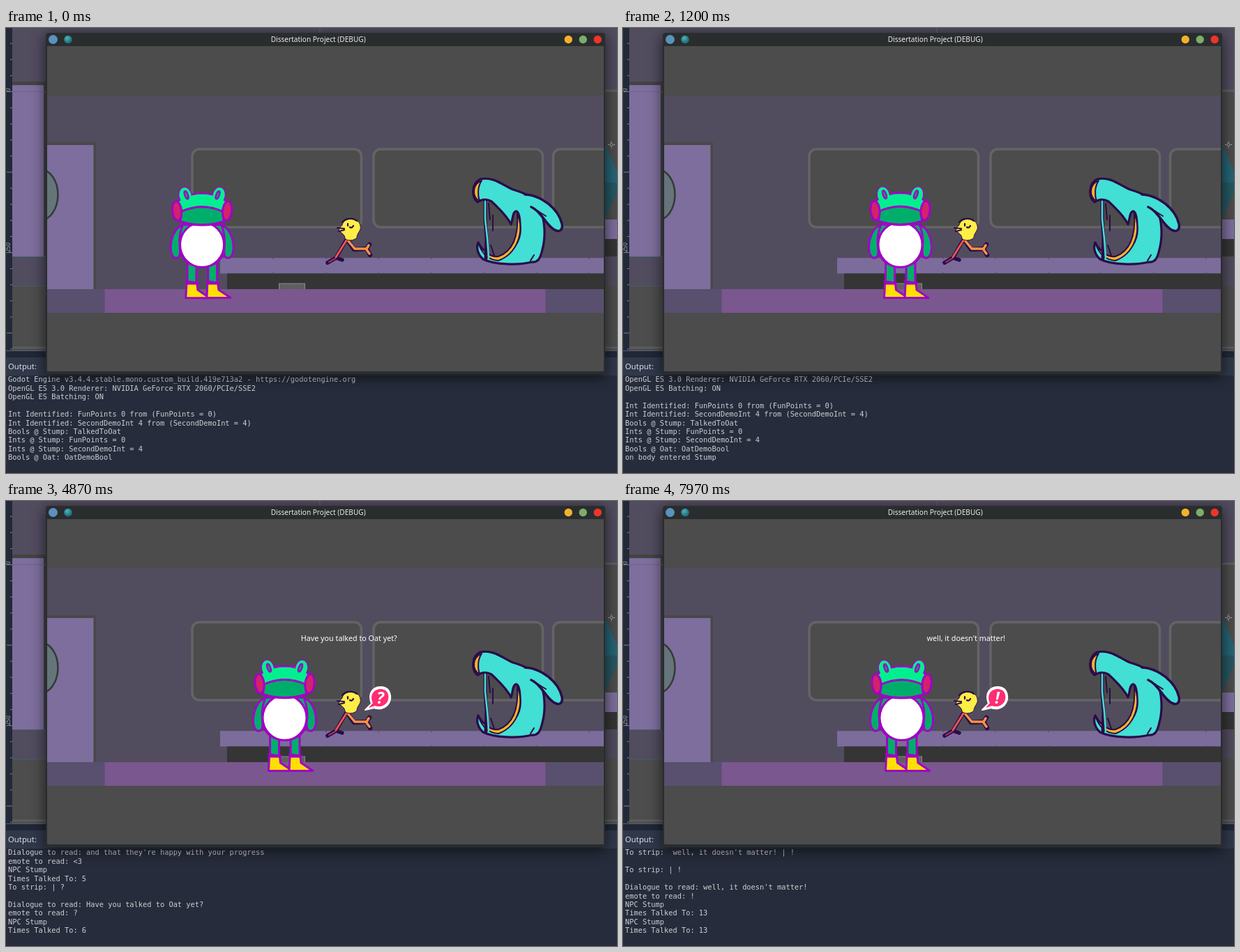
An HTML page for the animation above (8000 ms loop, 876 px wide and 639 px high).

```html
<!DOCTYPE html>
<html lang="en">
<head>
<meta charset="utf-8">
<title>Dialogue demo</title>
<style>
html, body { margin: 0; width: 100%; height: 100%; overflow: hidden; background: #262c3b; }
svg { display: block; width: 876px; height: 639px; }
text { font-family: "Noto Sans", "Open Sans", sans-serif; white-space: pre; }
#log text { font: 10.35px "DejaVu Sans Mono", monospace; fill: #cdcfd2; }
#win { filter: drop-shadow(0 4px 10px rgba(0,0,0,.65)); }
.frog { stroke: #a004c4; stroke-width: 3; stroke-linejoin: round; stroke-linecap: round; }
.ink { stroke: #2b0c49; stroke-linejoin: round; stroke-linecap: round; }
.mid { text-anchor: middle; }
</style>
</head>
<body>
<svg viewBox="0 0 876 639">
  <defs>
    <clipPath id="view"><rect x="59" y="26" width="798" height="467"/></clipPath>
    <radialGradient id="orb" cx=".4" cy=".35"><stop offset="0" stop-color="#4fb5bd"/><stop offset="1" stop-color="#237582"/></radialGradient>
    <ellipse id="ear" cx="-24" cy="240" rx="8.5" ry="12" transform="rotate(-12 -24 240)" fill="#00f08f"/>
    <g id="earFace"><use href="#ear" stroke="none"/>
      <ellipse cx="-22.500" cy="239" rx="2.200" ry="6" transform="rotate(-20 -22.500 239)" fill="#00ae6b" stroke-width="2.400"/></g>
    <path id="arm" d="M-28 283C-38 285 -45 301 -45 315C-45 325 -41 331 -36 330C-31 329 -31 322 -32 314C-33 305 -33 296 -28 283" fill="#00ae6b"/>
    <ellipse id="cheek" cx="-36" cy="262" rx="6.500" ry="14" transform="rotate(-6 -36 262)" fill="#d3226c"/>
    <g id="leg"><path d="M-21 337V366H-8V337Z" fill="#00ae6b"/>
      <path d="M-22 367H-7L-6 376L11 387.500H-23Z" fill="#ffe000"/>
      <path d="M-23 363.500L-5 366" stroke-width="2.500"/></g>
  </defs>

  <!-- editor behind the window -->
  <rect width="876" height="470" fill="#4d4d4d"/>
  <rect width="876" height="78" fill="#524c5f"/>
  <path d="M450 0V8" stroke="#696474"/>
  <path d="M9 77H60V82H9Z" fill="#434343"/>
  <rect x="9" y="82" width="45" height="246" fill="#7d6e9d"/>
  <rect x="54" y="82" width="6" height="246" fill="#454545"/>
  <rect x="9" y="328" width="867" height="42" fill="#514c5e"/>
  <path d="M9 328.500H60M9 370.500H60" stroke="#40687c" opacity=".7"/>
  <path d="M9 91.500H60" stroke="#71608e"/>
  <path d="M9 459H876" stroke="#5d5d5d" stroke-width="3"/>
  <rect x="858" width="18" height="88" fill="#514c5e"/>
  <path d="M858 90H876" stroke="#626262" stroke-width="3"/>
  <path d="M858 165L876 207V222H858Z" fill="#246474"/>
  <path d="M858 222H876V236L858 275Z" fill="#255763"/>
  <rect x="858" y="275" width="18" height="28" fill="#7d6e9d"/>
  <rect x="858" y="303" width="18" height="25" fill="#353535"/>
  <g stroke="#aaa" fill="none"><circle cx="868" cy="167.500" r="2"/><path d="M863 167.500H865M871 167.500H873M868 162.500V164.500M868 170.500V172.500"/></g>
  <rect width="9" height="463" fill="#222938"/>
  <g id="ruler" stroke="#7e8593"></g>
  <g fill="#a5abb5" font-size="8"><text transform="translate(6 91) rotate(-90)">0</text><text transform="translate(6 322) rotate(-90)">250</text></g>
  <rect y="463" width="876" height="10" fill="#202736"/>
  <path d="M0 463.500H876" stroke="#596174"/>
  <rect y="473" width="876" height="26" fill="#30384a"/>
  <text x="3" y="490" font-size="11.3" fill="#dadde2">Output:</text>
  <rect y="499" width="876" height="140" fill="#262c3b"/>
  <g id="log"></g>

  <g id="win">
    <path d="M57 497V11Q57 7 61 7H855Q859 7 859 11V497Z" fill="#292d2e"/>
  </g>
  <circle cx="67.500" cy="16.500" r="6.500" fill="#5b91bd"/>
  <circle cx="89" cy="16.500" r="5.800" fill="url(#orb)"/>
  <text class="mid" x="447.700" y="20.300" font-size="10.1" fill="#ececec">Dissertation Project (DEBUG)</text>
  <circle cx="806.300" cy="16.500" r="5.700" fill="#f6b12b"/>
  <circle cx="827.300" cy="16.500" r="5.700" fill="#7cad69"/>
  <circle cx="848.300" cy="16.500" r="5.700" fill="#ee342b"/>

  <g clip-path="url(#view)">
    <rect x="59" y="26" width="798" height="467" fill="#4c4c4c"/>
    <rect x="59" y="97" width="798" height="278" fill="#524c5f"/>
    <g fill="#4c4c4c" stroke="#646464" stroke-width="3.500">
      <rect x="267" y="174" width="242.500" height="112" rx="10"/>
      <rect x="527" y="174" width="242.500" height="112" rx="10"/>
      <rect x="784.500" y="174" width="242" height="112" rx="10"/>
    </g>
    <rect x="50" y="164" width="79" height="211" fill="#484848"/>
    <rect x="50" y="168" width="75.500" height="207" fill="#7d6e9d"/>
    <ellipse cx="48" cy="239.500" rx="26.500" ry="37" fill="#65757a" stroke="#353936" stroke-width="2.500"/>
    <rect x="307" y="330" width="560" height="22.500" fill="#7c6c9c"/>
    <rect x="317" y="352.500" width="550" height="22.500" fill="#353535"/>
    <path d="M307 330.500H860" stroke="#75668f"/>
    <path id="seams" stroke="#45405a"/>
    <rect x="391.500" y="367" width="37" height="10" fill="#5f5f5f" stroke="#8b8b8b"/>
    <rect x="59" y="375" width="798" height="34" fill="#594f6e"/>
    <rect x="141.500" y="375" width="632" height="34" fill="#7b578f"/>

    <!-- small runner -->
    <g class="ink" fill="none">
      <path d="M488 304L473 330L461 337M473 330L482 333" stroke-width="5.500"/>
      <path d="M490 305L499 318L517 317L522 326M517 317L521 311" stroke-width="6.500"/>
      <path d="M488 305L473 329" stroke="#f0584c" stroke-width="2.800"/>
      <path d="M472 331L463 336" stroke="#b5395d" stroke-width="2"/>
      <path d="M491 306L500 317L516 317L521 324M517 317L520 312" stroke="#fa9440" stroke-width="3.500"/>
      <path d="M482 283C484 271 506 271 508 284C510 291 503 294 503 301C499 306 488 306 486 302C486 297 481 294 477 291L479 286Z" fill="#ffee45" stroke-width="1"/>
      <path d="M482 279C486 273 498 272 503 277M475 287L485 288M477 292L485 290M490 284V281M493 286Q496 288 498 284" stroke-width="2.200"/>
    </g>

    <!-- large creature -->
    <g class="ink" fill="#42dfd4" stroke-width="3.200">
      <path d="M676 250C667 243 667 223 680 217C700 213 712 226 727 232C745 237 759 246 765 258C773 275 774 300 769 318C766 332 762 337 754 336C735 341 700 340 684 332C676 325 674 315 677 308C683 319 691 329 705 329C726 325 739 305 737 285C737 272 735 263 731 263C726 265 727 274 724 282C719 271 708 260 696 249C689 245 682 246 676 250Z"/>
      <path d="M744 239C765 240 791 257 797 281C799 291 793 294 785 289C773 281 767 263 753 257" stroke-width="3.500"/>
      <path d="M753 257L774 270" stroke-width="2"/>
      <path d="M679 249C667 241 669 224 682 219C676 228 676 240 679 249Z" fill="#f8b52d" stroke-width="2"/>
      <path d="M733 266C744 292 733 324 706 334C690 333 682 322 678 311C685 322 696 330 706 328C728 320 735 296 733 266Z" fill="#f8b52d" stroke-width="2"/>
      <path d="M687 248V274L689 302L688 331" fill="none" stroke-width="5"/>
      <path d="M687 249V274L690 302L692 330" fill="none" stroke="#42dfd4" stroke-width="2.500"/>
      <path d="M698 269V291M692 252L694 275M695 312L700 327M757 326L752 334" fill="none" stroke-width="2"/>
    </g>

    <g id="bubble">
      <path d="M515 300L524 291C518 275 527 266 539 267C552 268 553 283 549 290C543 300 533 299 528 297Z" fill="#fff" stroke="#fff" stroke-width="2" stroke-linejoin="round"/>
      <path d="M520 297L526 290C521 279 527 270 537 270C549 270 550 282 547 288C542 296 534 296 529 294Z" fill="#ff2d73"/>
      <text id="mark" class="mid" x="536.500" y="291" font-size="23" font-weight="900" font-style="italic" fill="#fff"></text>
      <path id="heart" d="M537 293C527 286 527 275 532 275Q536 275 537 279Q539 274 543 275C548 277 546 286 537 293Z" fill="#fff"/>
    </g>

    <g id="frog" class="frog" fill="none">
      <g id="legL"><use href="#leg"/></g>
      <g id="legR"><use href="#leg" x="29.500"/></g>
      <g id="torso">
        <path d="M-28 282Q-37 300 -31 322Q-24 342 0 343.500Q24 342 31 322Q37 300 28 282Z" fill="#00ae6b"/>
        <use href="#arm"/><use href="#arm" transform="scale(-1 1)"/>
        <ellipse cy="311" rx="31.500" ry="32.500" fill="#fff"/>
        <use href="#ear"/><use href="#ear" transform="scale(-1 1)"/>
        <path d="M-41 256C-37 246 -20 236.500 0 236.500C20 236.500 37 246 41 256L32 277Q0 288 -32 277Z" fill="#00f08f"/>
        <use href="#earFace"/><use href="#earFace" transform="scale(-1 1)"/>
        <path d="M-30 263Q0 249 30 263L31 277Q0 287 -31 277Z" fill="#00ae6b"/>
        <use href="#cheek"/><use href="#cheek" transform="scale(-1 1)"/>
      </g>
    </g>
    <text id="speech" class="mid" x="491.800" y="201.300" font-size="10.75" fill="#fff"></text>
  </g>
</svg>
<script>
const LOOP = 8000;
const $ = id => document.getElementById(id);
const put = (id, value) => $(id).setAttribute("transform", value);

const talk = (words, emote, count) => [
  "To strip: | " + emote, "", "Dialogue to read: " + words,
  "emote to read: " + emote, "NPC Stump", "Times Talked To: " + count];
const branch = (words, emote, count) => [
  `To strip:  ${words} | ${emote}`, "", ...talk(words, emote, count),
  "NPC Stump", "Times Talked To: " + count];
const say = (at, words, emote, count, make = talk) =>
  ({ at, words, emote, lines: make(words, emote, count) });

const events = [
  { at: 0, lines: [
    "Godot Engine v3.4.4.stable.mono.custom_build.419e713a2 - https://godotengine.org",
    "OpenGL ES 3.0 Renderer: NVIDIA GeForce RTX 2060/PCIe/SSE2",
    "OpenGL ES Batching: ON", "",
    "Int Identified: FunPoints 0 from (FunPoints = 0)",
    "Int Identified: SecondDemoInt 4 from (SecondDemoInt = 4)",
    "Bools @ Stump: TalkedToOat",
    "Ints @ Stump: FunPoints = 0",
    "Ints @ Stump: SecondDemoInt = 4",
    "Bools @ Oat: OatDemoBool"] },
  { at: 1100, lines: ["on body entered Stump"] },
  say(2050, "Hello there! I hope the demo is going well", "!", 4),
  say(3150, "and that they're happy with your progress", "<3", 5),
  say(4050, "Have you talked to Oat yet?", "?", 6),
  say(5500, "Oh, you haven't talked to Oat yet?", "?", 12, branch),
  say(6470, "well, it doesn't matter!", "!", 13, branch)
];

const stalls = [[870, 1100], [6270, 6470]];

const SVG = "http://www.w3.org/2000/svg";
const rows = Array.from({ length: 10 }, (_, i) => {
  const row = document.createElementNS(SVG, "text");
  row.setAttribute("x", 3);
  row.setAttribute("y", Math.round(508.3 + i * 12.44));
  return $("log").appendChild(row);
});

for (let i = -3; i < 17; i++) {
  const tick = document.createElementNS(SVG, "path");
  tick.setAttribute("d", `M${i % 5 ? 6 : 1} ${(91.5 + i * 23.1).toFixed(1)}H9`);
  $("ruler").append(tick);
}
$("seams").setAttribute("d", Array.from({ length: 7 }, (_, i) => {
  const x = 383 + Math.round(i * 75.5);
  return `M${x} 330v2M${x} 351v3`;
}).join(""));

let shown = -1;
function showEvent(n) {
  if (n === shown) return;
  shown = n;
  const lines = events.slice(0, n + 1).flatMap(e => e.lines).slice(-10);
  rows.forEach((row, i) => row.textContent = lines[i]);
  const { words = "", emote = "" } = events[n];
  $("speech").textContent = words;
  $("bubble").style.display = words ? "" : "none";
  $("heart").style.display = emote === "<3" ? "" : "none";
  $("mark").textContent = emote === "<3" ? "" : emote;
}

function drawFrog(t) {
  for (const [from, to] of stalls) if (t >= from && t < to) t = from;
  const x = Math.min(399.5, 281 + 0.097 * t);
  const swing = t < 1100 ? 38 * Math.sin(Math.PI * t / 335) : 0;
  const stretch = 1 - 0.008 * Math.cos(2 * Math.PI * t / 1000);
  put("frog", `translate(${x} 0)`);
  put("legL", `rotate(${swing} -14 338)`);
  put("legR", `rotate(${-swing} 15 338)`);
  put("torso", `translate(0 346) scale(1 ${stretch}) translate(0 -346)`);
}

const start = performance.now();
function frame(now) {
  const t = Math.max(0, now - start) % LOOP;
  showEvent(events.findLastIndex(e => e.at <= t));
  drawFrog(t);
  requestAnimationFrame(frame);
}
frame(start);
</script>
</body>
</html>
```
